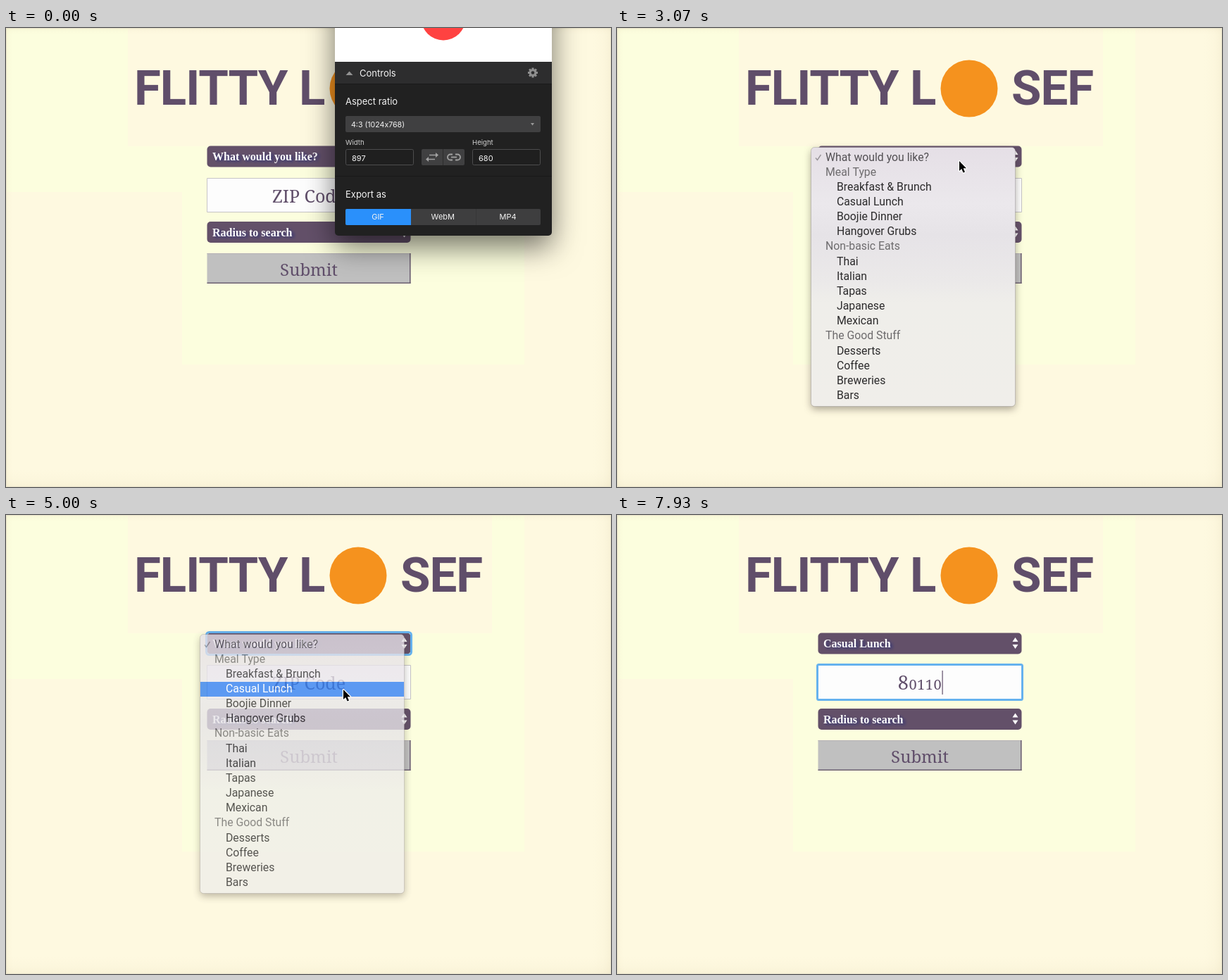
Recreate the animation shown at these times as an HTML page with a canvas. Size 859 by 652 pixels, loop 8 s.

```html
<!DOCTYPE html>
<html lang="en">
<head>
<meta charset="utf-8">
<title>Food finder</title>
<style>
  html, body { margin: 0; width: 100%; height: 100%; overflow: hidden; background: #fef9e0; }
  canvas { display: block; }
</style>
</head>
<body>
<canvas id="stage" width="859" height="652"></canvas>
<script>
const W = 859, H = 652, LOOP = 8000;
const PLUM = '#635069', RING = '#66b2ee', INK = '#604e6a';
const SERIF = '"Noto Serif", serif';
const SELECT_FONT = 'bold 16px "Liberation Serif", serif';
const SANS = 'Inter, sans-serif';
const MENU_FONT = '15.8px Roboto, sans-serif';

const stageCtx = document.getElementById('stage').getContext('2d');
const scratch = document.createElement('canvas');
scratch.width = W;
scratch.height = H;
let c = stageCtx;

const FIRST_ROW = 183, ROW_H = 21.16;
const ROWS = [
  'What would you like?', '#Meal Type', 'Breakfast & Brunch', 'Casual Lunch',
  'Boojie Dinner', 'Hangover Grubs', '#Non-basic Eats', 'Thai', 'Italian', 'Tapas',
  'Japanese', 'Mexican', '#The Good Stuff', 'Desserts', 'Coffee', 'Breweries', 'Bars'
];

const TIME = {
  panelOut: [70, 210], menuOpen: 2740, focus: 3530, blink: [4760, 4830],
  menuOut: [4950, 5200], zipClick: 5870
};
const ZIP = '80110';
const KEYS = [6500, 6800, 7070, 7270, 7600];

// Pointer stops: time, x, y
const PATH = [
  [800, 626, -24], [1650, 478, 193], [2050, 478, 193], [2600, 486, 189],
  [3300, 486, 189], [4050, 479, 248], [5230, 479, 248], [5720, 495, 234]
];

const clamp = v => Math.max(0, Math.min(1, v));
const ease = v => v * v * (3 - 2 * v);
const progress = (t, [from, to]) => clamp((t - from) / (to - from));

function pointerAt(t) {
  let prev = PATH[0];
  for (const stop of PATH) {
    if (t < stop[0]) {
      const k = ease(progress(t, [prev[0], stop[0]]));
      return { x: prev[1] + (stop[1] - prev[1]) * k, y: prev[2] + (stop[2] - prev[2]) * k };
    }
    prev = stop;
  }
  return { x: prev[1], y: prev[2] };
}

function box(x, y, w, h, fill, r = 0, stroke) {
  c.beginPath();
  c.roundRect(x, y, w, h, r);
  if (fill) { c.fillStyle = fill; c.fill(); }
  if (stroke) { c.strokeStyle = stroke; c.stroke(); }
}

function disc(x, y, r, fill) {
  c.beginPath();
  c.arc(x, y, r, 0, Math.PI * 2);
  c.fillStyle = fill;
  c.fill();
}

function trace(points, close) {
  c.beginPath();
  points.forEach(([x, y], i) => i ? c.lineTo(x, y) : c.moveTo(x, y));
  if (close) c.closePath();
}

function poly(points, fill) {
  trace(points, true);
  c.fillStyle = fill;
  c.fill();
}

function line(points, color, width = 1) {
  trace(points);
  c.strokeStyle = color;
  c.lineWidth = width;
  c.stroke();
  c.lineWidth = 1;
}

function label(str, x, y, font, color, align = 'left') {
  c.font = font;
  c.fillStyle = color;
  c.textAlign = align;
  c.fillText(str, x, y);
}

function shadow(color, blur, dx, dy) {
  c.shadowColor = color;
  c.shadowBlur = blur;
  c.shadowOffsetX = dx;
  c.shadowOffsetY = dy;
}
const noShadow = () => shadow('transparent', 0, 0, 0);

// Draws a group on its own surface so that it fades as one piece
function layer(alpha, draw) {
  if (alpha <= 0) return;
  c = scratch.getContext('2d');
  c.clearRect(0, 0, W, H);
  draw();
  c = stageCtx;
  c.globalAlpha = alpha;
  c.drawImage(scratch, 0, 0);
  c.globalAlpha = 1;
}

function edgeShade(x0, y0, x1, y1) {
  const g = c.createLinearGradient(x0, y0, x1, y1);
  g.addColorStop(0, 'rgba(214,200,160,.16)');
  g.addColorStop(.4, 'rgba(226,212,176,.07)');
  g.addColorStop(1, 'rgba(240,225,190,0)');
  box(0, 0, W, H, g);
}

function drawPage() {
  box(0, 0, W, H, '#fef9e0');
  const tint = '#fcfede';
  box(0, 0, 173, 233, tint);
  box(173, 168, 77, 65, tint);
  box(250, 168, 486, 310, tint);
  box(690, 0, 46, 168, tint);
  edgeShade(0, 0, 0, 10);
  edgeShade(0, 0, 10, 0);
  edgeShade(0, H, 0, H - 26);
  edgeShade(W, 0, W - 26, 0);
  box(.5, .5, W - 1, H - 1, null, 0, '#e8e2ca');
}

function drawTitle() {
  const font = '700 69px Roboto, sans-serif';
  c.letterSpacing = '-1px';
  label('FLITTY', 182, 108.5, font, INK);
  label('L', 416, 108.5, font, INK);
  label('SEF', 560, 108.5, font, INK);
  c.letterSpacing = '0px';
  disc(500, 86, 40.5, '#f5921e');
}

function focusRing(x, y, w, h, r) {
  c.lineWidth = 3;
  box(x - .5, y - .5, w + 1, h + 1, null, r, RING);
  c.lineWidth = 1;
}

function drawSelect(y, h, str, focused) {
  box(285.5, y, 289, h, PLUM, 5);
  if (focused) focusRing(285, y - .5, 290, h + 1, 4);
  shadow('#2f3377', 4, 3, 2);
  label(str, 293, y + 20.5, SELECT_FONT, '#fff');
  noShadow();
  const m = y + h / 2 - .5;
  poly([[561.5, m - 2], [565.5, m - 8], [569.5, m - 2]], '#fff');
  poly([[561.5, m + 2], [565.5, m + 8], [569.5, m + 2]], '#fff');
}

function drawZip(t) {
  const focused = t >= TIME.zipClick;
  box(285.5, 213.5, 289, 48, '#fdfdfd', 0, '#c6c4c6');
  if (!focused) {
    label('ZIP Code', 430, 248, '25px ' + SERIF, INK, 'center');
    return;
  }
  focusRing(285, 213, 290, 49, 2);

  // Low digits sit at x-height beside a full-height eight
  const count = KEYS.filter(k => t >= k).length;
  const glyphs = [...ZIP.slice(0, count)].map(ch => {
    const font = (ch === '8' ? 27 : 20) + 'px ' + SERIF;
    c.font = font;
    return { ch, font, w: c.measureText(ch).width + .5 };
  });
  const total = glyphs.reduce((sum, g) => sum + g.w, 0);
  let x = 430 - total / 2;
  for (const g of glyphs) {
    label(g.ch, x, 248, g.font, INK);
    x += g.w;
  }
  const since = t - (count ? KEYS[count - 1] : TIME.zipClick);
  if (since % 1000 < 500) box(Math.round(x) + .5, 221, 1.2, 34, INK);
}

function drawSubmit() {
  box(285.5, 320, 289, 43, '#c0c0c0');
  box(285.5, 320, 289, 1, '#b4b0b6');
  box(573, 320, 1.5, 43, '#6d6072');
  box(285.5, 361.5, 289, 1.5, '#6d6072');
  label('Submit', 430, 352, '24px ' + SERIF, INK, 'center');
}

function drawMenu(active) {
  const g = c.createLinearGradient(0, 169, 0, 538);
  g.addColorStop(0, '#e5dfe6');
  g.addColorStop(.22, '#ebe8ec');
  g.addColorStop(.34, '#e6e3e7');
  g.addColorStop(.52, '#ebe9e9');
  g.addColorStop(.6, '#efeeea');
  g.addColorStop(1, '#f0eeea');
  shadow('rgba(70,60,50,.45)', 11, 0, 4);
  box(275.5, 169.5, 290, 368, g, 5);
  noShadow();
  box(275.5, 169.5, 290, 368, null, 5, 'rgba(90,80,90,.25)');
  line([[282, 184.5], [284.5, 187.5], [289.5, 180]], '#99959a', 1.4);
  ROWS.forEach((row, i) => {
    const y = FIRST_ROW + i * ROW_H;
    const head = row[0] === '#';
    const on = i === active;
    if (on) box(276, y - 9.5, 289, 21, '#3480f0');
    const color = on ? '#fff' : head ? '#6e6c6e' : i ? '#2c2b2c' : '#535054';
    label(row.replace('#', ''), i && !head ? 312 : 296, y + 5.5, MENU_FONT, color);
  });
}

function drawGear(x, y) {
  for (let i = 0; i < 8; i++) {
    const a = i * Math.PI / 4;
    line([[x, y], [x + 7 * Math.cos(a), y + 7 * Math.sin(a)]], '#8e8e8e', 3);
  }
  disc(x, y, 5.4, '#8e8e8e');
  disc(x, y, 2.3, '#2d2d2e');
}

function drawSwap(x, y) {
  const gray = '#a2a2a2';
  line([[x - 4, y - 3], [x + 6, y - 3]], gray, 1.5);
  line([[x - 6, y + 3], [x + 4, y + 3]], gray, 1.5);
  poly([[x + 5, y - 6.5], [x + 9, y - 3], [x + 5, y + .5]], gray);
  poly([[x - 5, y - .5], [x - 9, y + 3], [x - 5, y + 6.5]], gray);
}

function drawLink(x, y) {
  c.lineWidth = 1.8;
  box(x - 9, y - 4, 18, 8, null, 4, '#a2a2a2');
  box(x - 2, y - 6, 4, 12, '#404041');
  c.lineWidth = 1;
  line([[x - 4, y], [x + 4, y]], '#a2a2a2', 1.8);
}

function drawPanel() {
  const small = '9.6px ' + SANS, mid = '11px ' + SANS, big = '13px ' + SANS;
  shadow('rgba(0,0,0,.55)', 42, 0, 16);
  box(467, -130, 308, 425, '#212121', 5);
  noShadow();
  box(467, -10, 308, 58, '#fff');
  disc(621, -14, 31.5, '#ff4241');
  box(467, 48, 308, 31, '#2d2d2e');
  box(467, 79, 308, 1, '#1a1a1a');
  box(467, 210, 308, 1, '#191919');
  poly([[482.5, 67], [487.5, 61.5], [492.5, 67]], '#929292');
  label('Controls', 502, 69, big, '#f4f4f4');
  drawGear(748, 63.5);

  label('Aspect ratio', 482, 108.5, big, '#f4f4f4');
  box(482, 125, 277, 23, '#404041', 2);
  label('4:3 (1024x768)', 490, 140.5, '10.6px ' + SANS, '#f4f4f4');
  poly([[745, 135], [750, 135], [747.5, 138.5]], '#9a9a9a');
  label('Width', 482, 165.5, small, '#d2d2d2');
  label('Height', 662, 165.5, small, '#d2d2d2');
  for (const [x, value] of [[482.5, '897'], [662.5, '680']]) {
    box(x, 172.5, 96, 22, '#1f1f1f', 2, '#4d4d4e');
    label(value, x + 8.5, 188.5, mid, '#f4f4f4');
  }
  box(590, 172, 61, 23, '#404041', 2);
  box(620, 172, 1, 23, '#2c2c2c');
  drawSwap(605, 183.5);
  drawLink(636, 183.5);

  label('Export as', 482, 240.5, big, '#f4f4f4');
  box(482, 257, 277, 23, '#3e3e3f', 2);
  box(482, 257, 93, 23, '#2a90fb', [2, 0, 0, 2]);
  box(667, 257, 1, 23, '#373738');
  ['GIF', 'WebM', 'MP4'].forEach((s, i) =>
    label(s, 528 + i * 92.3, 272, mid, '#f4f4f4', 'center'));
}

function drawArrow() {
  trace([[0, 0], [0, 14], [3.2, 11], [5.6, 16.4], [8, 15.4], [5.7, 10.2], [10, 10.2]], true);
  c.lineJoin = 'round';
  c.lineWidth = 2.4;
  c.strokeStyle = '#fff';
  c.stroke();
  c.fillStyle = '#000';
  c.fill();
  c.lineWidth = 1;
}

function drawHand() {
  const fingers = [
    [[-2.5, 3], [-1, 8]], [[1.2, 1], [1.8, 8]], [[4.8, 1.2], [4.6, 8]],
    [[8.2, 3.6], [7.2, 9]], [[-4, 7.6], [0, 12]]
  ];
  c.lineCap = 'round';
  c.lineJoin = 'round';
  const palm = [[-1, 8], [7.4, 8], [6.5, 12.5], [1.5, 12.5]];
  trace(palm, true);
  c.lineWidth = 4.6;
  c.strokeStyle = '#000';
  c.stroke();
  for (const f of fingers) line(f, '#000', 4.4);
  trace(palm, true);
  c.lineWidth = 2.2;
  c.strokeStyle = '#fff';
  c.stroke();
  c.fillStyle = '#fff';
  c.fill();
  for (const f of fingers) line(f, '#fff', 2.2);
  for (const x of [.2, 3.2, 6]) line([[x, 5], [x, 8.5]], '#000', .8);
  c.lineCap = 'butt';
}

function drawBeam() {
  const strokes = [
    [[0, -6], [0, 6]], [[-3.5, -7.5], [-1.5, -7.5], [0, -6], [1.5, -7.5], [3.5, -7.5]],
    [[-3.5, 7.5], [-1.5, 7.5], [0, 6], [1.5, 7.5], [3.5, 7.5]], [[-1.8, 2.5], [1.8, 2.5]]
  ];
  for (const s of strokes) line(s, 'rgba(255,255,255,.8)', 2.6);
  for (const s of strokes) line(s, '#222', 1.2);
}

function drawPointer(t, p, menuOpen) {
  if (t < PATH[0][0] || t >= KEYS[0]) return;
  const within = (top, bottom) => p.x > 285 && p.x < 575 && p.y > top && p.y < bottom;
  c.save();
  c.translate(p.x, p.y);
  if (!menuOpen && within(168, 198)) drawHand();
  else if (!menuOpen && within(213, 262)) drawBeam();
  else drawArrow();
  c.restore();
}

function hoveredRow(t, p) {
  if (t >= TIME.blink[0] && t < TIME.blink[1]) return -1;
  const i = Math.floor((p.y - FIRST_ROW) / ROW_H + .5);
  return i > 0 && ROWS[i] && ROWS[i][0] !== '#' ? i : -1;
}

function render(t) {
  const p = pointerAt(t);
  const menuAlpha = t < TIME.menuOpen ? 0 : 1 - progress(t, TIME.menuOut);
  const chosen = t >= TIME.menuOut[1];
  drawPage();
  drawTitle();
  drawSelect(167.5, 30, chosen ? 'Casual Lunch' : ROWS[0], t >= TIME.focus && t < TIME.zipClick);
  drawZip(t);
  drawSelect(275, 30, 'Radius to search', false);
  drawSubmit();
  layer(menuAlpha, () => drawMenu(hoveredRow(t, p)));
  layer(1 - progress(t, TIME.panelOut), drawPanel);
  drawPointer(t, p, menuAlpha > 0);
}

const start = performance.now();
function tick() {
  render((performance.now() - start) % LOOP);
  requestAnimationFrame(tick);
}
tick();
</script>
</body>
</html>
```
